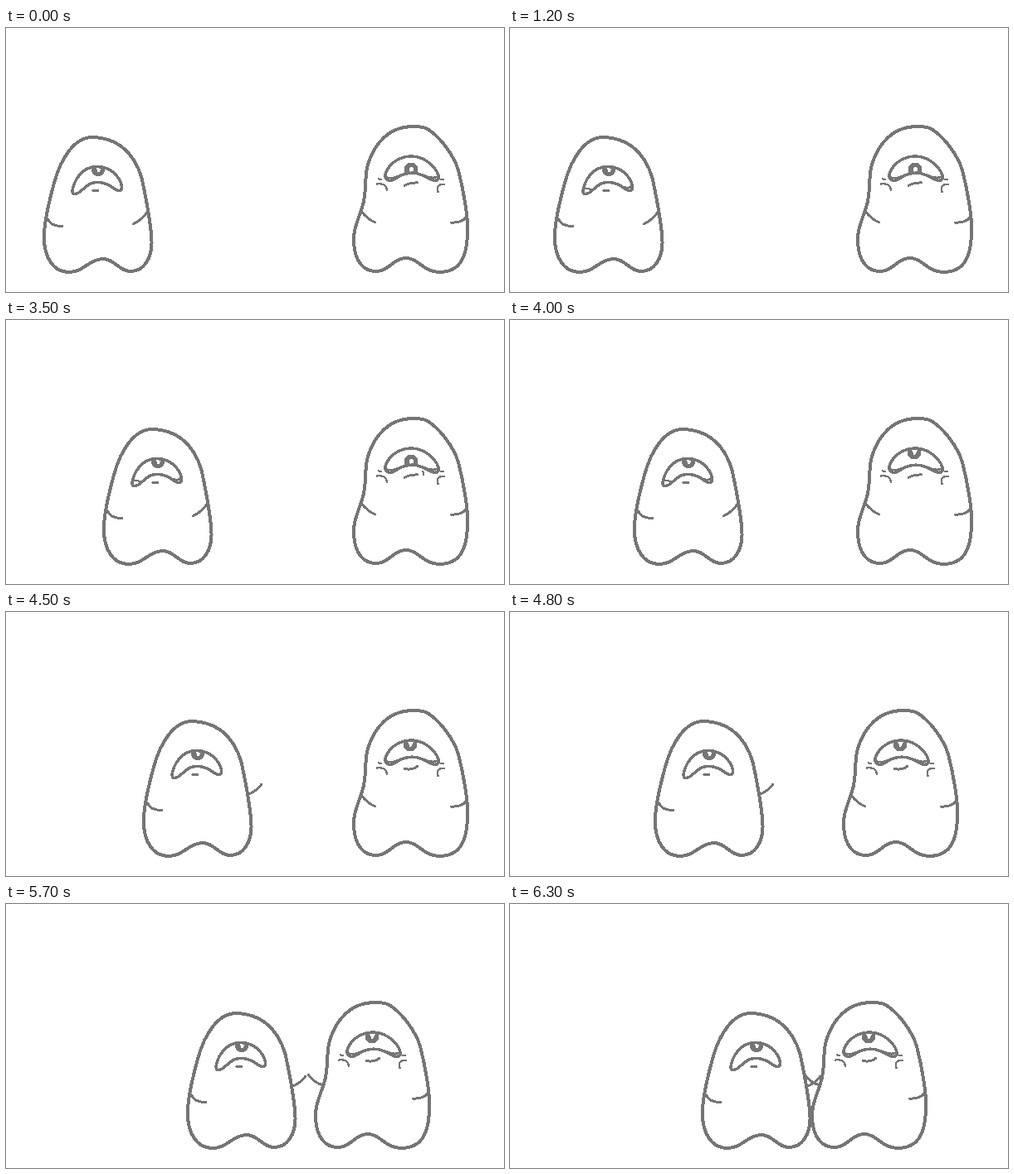
Write an HTML page that moves like this. It is 600 by 319 pixels and loops after 8 s.

```html
<!DOCTYPE html>
<html lang="en">
<head>
<meta charset="utf-8">
<title>Two friends</title>
<style>
html, body { margin: 0; width: 100%; height: 100%; overflow: hidden; background: #fff; }
svg { display: block; width: 600px; height: 319px; shape-rendering: crispEdges; }
path, circle { fill: none; stroke: #757575; stroke-width: 3; stroke-linecap: round; stroke-linejoin: round; }
.body { stroke-width: 4; }
.eye { stroke-width: 3.5; }
.thin { stroke-width: 2.3; }
.iris { fill: #757575; stroke: none; }
.glint { fill: #fff; stroke: none; }
</style>
</head>
<body>
<svg viewBox="0 0 600 319">
  <defs>
    <path id="smallEye" class="eye" d="M81 200C77 197 86 167.5 110 167.5C130 167.5 142 187 139 195C136 200 130 193 124 190C114 185 104 185 96 192C90 197 86 202 81 200Z"/>
    <path id="tallEye" class="eye" d="M458 182C453 176 466 155 488 155C508 155 523 174 521 182C518 188 508 181 502 178C493 174 484 174 474 179C468 183 462 187 458 182Z"/>
    <clipPath id="smallClip"><use href="#smallEye"/></clipPath>
    <clipPath id="tallClip"><use href="#tallEye"/></clipPath>
  </defs>
  <g id="small">
    <path class="body" d="M104 132C82 132 66 158 58 187C53 207 46.5 228 46 250C45 277 57 295 76 295C93 295 101 279 117 279C130 279 137 294 150 294C167 294 176 277 175.5 258C175 240 169 208 166 193C161 162 143 133 104 132Z"/>
    <path d="M50 230Q54 240 68 239.5"/>
    <path id="smallArm"/>
    <g clip-path="url(#smallClip)">
      <circle class="iris" cx="111" cy="171" r="8.2"/>
      <path class="glint" d="M108.5 168h6.5l-2.5 6h-2Z"/>
      <path id="lids" class="thin" d="M80 194Q86 193 91 196M129 192Q135 194 140 191"/>
    </g>
    <use href="#smallEye"/>
    <path d="M105 196.5H111"/>
  </g>
  <g id="tall">
    <path class="body" d="M490 119C463 119 444 138 436 165C431 180 436 195 429 217C424 232 418 245 419 259C420 282 431 294 446 294C461 294 467 278 482 278C497 278 503 295 522 295C547 295 557 277 556 240C556 225 551 195 545 172C539 152 522 131 508 122C503 119 496 119 490 119Z"/>
    <path id="tallArm"/>
    <path d="M555 228Q549 236 536 235"/>
    <g clip-path="url(#tallClip)">
      <g id="ahead">
        <circle class="iris" cx="488" cy="171" r="8.4"/>
        <circle class="glint" cx="488.5" cy="171" r="3"/>
      </g>
      <g id="up">
        <circle class="iris" cx="487" cy="160" r="8.4"/>
        <path class="glint" d="M484 157h7l-2.5 5.5h-2Z"/>
      </g>
      <path class="thin" d="M457 179.5Q464 183 472 179M504 178Q513 182.5 521 179.5"/>
    </g>
    <use href="#tallEye"/>
    <path class="thin" d="M449 182.5L452 183M447 188.5Q458 187 459 196M524 183H527M528 189Q518 188 520.5 198"/>
    <path id="tallMouth"/>
    <path id="drop" class="thin" d="M502.5 183L503 187"/>
  </g>
</svg>
<script>
const LOOP = 8000;
const $ = id => document.getElementById(id);

// Turning points of each walk: time, horizontal offset
const smallWalk = [[0, 0], [1700, 12], [2200, 24], [3500, 72], [4000, 104], [4800, 129], [5300, 155.5], [5900, 181], [6300, 186]];
const tallWalk = [[4500, 0], [4800, -17.5], [5300, -40], [6300, -55]];

// Slow poses at first, a pause, then ten drawings a second
function hold(t) {
  if (t < 3200) return Math.max(0, Math.min(2200, 200 + 500 * Math.floor((t - 200) / 500)));
  return Math.min(6300, 100 * Math.floor(t / 100));
}

function walk(points, t) {
  const next = points.findIndex(p => p[0] > t);
  if (next === 0) return points[0][1];
  if (next < 0) return points[points.length - 1][1];
  const [t0, a] = points[next - 1], [t1, b] = points[next];
  return a + (b - a) * (t - t0) / (t1 - t0);
}

const show = (id, on) => $(id).setAttribute("display", on ? "inline" : "none");
const slide = (id, x) => $(id).setAttribute("transform", `translate(${Math.round(x)} 0)`);
const shape = (id, d) => $(id).setAttribute("d", d);

function draw(time) {
  const t = hold(time);
  slide("small", walk(smallWalk, t));
  slide("tall", walk(tallWalk, t));
  shape("smallArm", t < 4400 ? "M171 221Q164 232 153 237" : "M171 221Q181 217 188 208");
  shape("tallArm", t < 5700 ? "M428 221Q435 231 445 235" : "M428 219Q417 216 410 206");
  shape("tallMouth", t < 4500 ? "M480 190.5Q487 186.5 496 187" : "M480 189.5Q489 191.5 495.5 186.5");
  show("lids", t >= 500 && t < 4400);
  show("drop", t >= 3500 && t < 3900);
  show("ahead", t < 3900);
  show("up", t >= 3900);
}

function tick() {
  draw(performance.now() % LOOP);
  requestAnimationFrame(tick);
}
tick();
</script>
</body>
</html>
```
